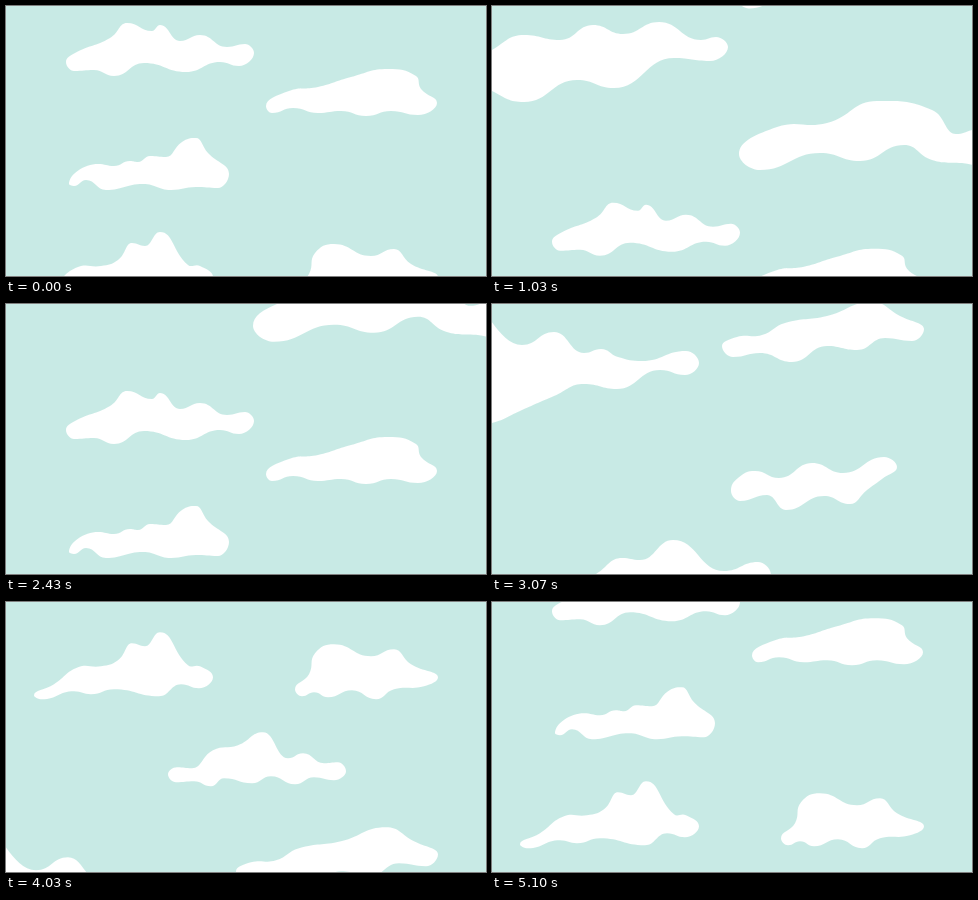
Recreate the animation shown at these times as an HTML page with a canvas. Size 480 px wide and 270 px high, loop 5130 ms.

```html
<!DOCTYPE html>
<html lang="en">
<head>
<meta charset="utf-8">
<title>Clouds</title>
<style>
html, body { margin: 0; width: 100%; height: 100%; overflow: hidden; background: #c8eae5; }
canvas { display: block; width: 480px; height: 270px; }
</style>
</head>
<body>
<canvas id="sky" width="480" height="270"></canvas>
<script>
const W = 480, H = 270, LOOP = 5130;
const ctx = document.getElementById('sky').getContext('2d');
const strip = new Path2D();

// Slope along one axis: none where the outline turns back.
const slope = (a, b, c) => (b - a) * (c - b) <= 0 ? 0 : c - a;

// Direction of the outline at q: level on crests and dips, upright at the ends.
function heading(p, q, r) {
  let x = slope(p[0], q[0], r[0]), y = slope(p[1], q[1], r[1]);
  if (!x && !y) [x, y] = [r[0] - p[0], r[1] - p[1]];
  const len = Math.hypot(x, y) || 1;
  return [x / len, y / len];
}

// Adds a wavy outline to the strip from its crests, dips and ends, moved down by dy.
function cloud(dy, ...xy) {
  const n = xy.length / 2;
  const pts = Array.from({ length: n }, (_, i) => [xy[2 * i], xy[2 * i + 1] + dy]);
  const at = i => pts[(i + n) % n];
  const dirs = pts.map((p, i) => heading(at(i - 1), p, at(i + 1)));
  strip.moveTo(...pts[0]);
  for (let i = 0; i < n; i++) {
    const p = at(i), q = at(i + 1), u = dirs[i], v = dirs[(i + 1) % n];
    const reach = d => 0.48 * (Math.abs(d[0] * (q[0] - p[0])) + Math.abs(d[1] * (q[1] - p[1])));
    const a = reach(u), b = reach(v);
    strip.bezierCurveTo(p[0] + u[0] * a, p[1] + u[1] * a, q[0] - v[0] * b, q[1] - v[1] * b, ...q);
  }
  strip.closePath();
}

cloud(0, 60,56, 69,47, 104,32, 121,17, 146,25, 154,19, 174,35, 194,29, 221,41, 239,38, 248,47,
  233,60, 214,56, 180,66, 138,57, 108,70, 88,64, 68,65);
cloud(0, 260,100, 283,85, 312,81, 345,71, 382,63, 410,70, 415,83, 431,97, 412,109, 385,105,
  360,110, 335,105, 312,107, 287,102, 266,107);
cloud(0, 63,178, 92,158, 108,160, 124,155, 132,156, 144,150, 160,151, 176,136, 190,132, 202,147,
  223,168, 212,182, 190,181, 165,184, 137,178, 100,184, 80,174, 68,180);
cloud(195, 28,94, 48,83, 72,66, 95,65, 112,59, 126,42, 139,45, 154,31, 182,64, 194,65, 207,76,
  193,87, 175,83, 153,95, 108,88, 85,93, 68,90, 36,98);
cloud(195, 289,88, 303,73, 309,52, 328,43, 365,55, 388,48, 405,63, 432,76, 418,85, 388,88,
  370,98, 346,89, 322,96, 308,91, 296,95);
cloud(195, 162,173, 171,166, 186,167, 207,149, 232,144, 257,131, 282,157, 297,152, 318,162,
  332,161, 340,170, 328,179, 308,176, 289,183, 265,175, 246,182, 218,177, 205,185, 188,180, 170,181);
cloud(243, 230,222, 245,213, 270,211, 293,199, 335,192, 380,178, 408,192, 432,205, 420,217,
  393,214, 365,226, 335,222, 300,238, 268,229, 241,233);
cloud(423, -30,4, 30,41, 62,28, 92,49, 109,45, 126,53, 150,57, 194,47, 207,59, 193,71, 168,66,
  125,85, 92,80, 62,92, 30,106, 0,119, -30,122);
cloud(423, 239,187, 246,174, 263,167, 287,174, 320,159, 351,169, 392,153, 405,163, 390,175,
  375,186, 358,200, 332,192, 294,206, 275,191, 248,197);
cloud(423, 60,296, 104,270, 130,254, 148,256, 181,236, 232,267, 266,258, 279,271, 262,285,
  215,290, 180,298, 80,304);
cloud(804.5, 243,-12, 275,-32, 350,-62, 400,-42, 425,-26, 410,-14, 345,-6, 300,-12, 257,2.5);
cloud(804.5, -30,65, 0,44, 32,29, 68,34, 101,19, 131,28, 167,16, 209,34, 224,31, 236,41, 218,55,
  182,52, 122,82, 85,74, 32,96, 0,85);
cloud(804.5, 247,148, 285,121, 335,117, 385,95, 440,104, 464,128, 480,124, 510,115, 510,160,
  470,157, 440,154, 412,139, 368,155, 328,147, 268,164);

// The strip passes five times; each entry is the step at which it sits at zero.
const zeros = [0, 37.8, 75.7, 113.6, 151.2];
const speed = pass => pass % 2 ? 26.44 : 25.95;

// Thirty steps a second, on a 10 ms grid.
function stepAt(ms) {
  const rest = ms % 100;
  return Math.floor(ms / 100) * 3 + (rest >= 30) + (rest >= 70);
}

function draw(ms) {
  const step = stepAt(ms);
  ctx.fillStyle = '#c8eae5';
  ctx.fillRect(0, 0, W, H);
  ctx.fillStyle = '#fff';
  zeros.forEach((zero, pass) => {
    ctx.save();
    ctx.translate(0, (zero - step) * speed(pass));
    ctx.fill(strip);
    ctx.restore();
  });
}

let start;
function tick(now) {
  if (start === undefined) start = now;
  draw((now - start) % LOOP);
  requestAnimationFrame(tick);
}
draw(0);
requestAnimationFrame(tick);
</script>
</body>
</html>
```
